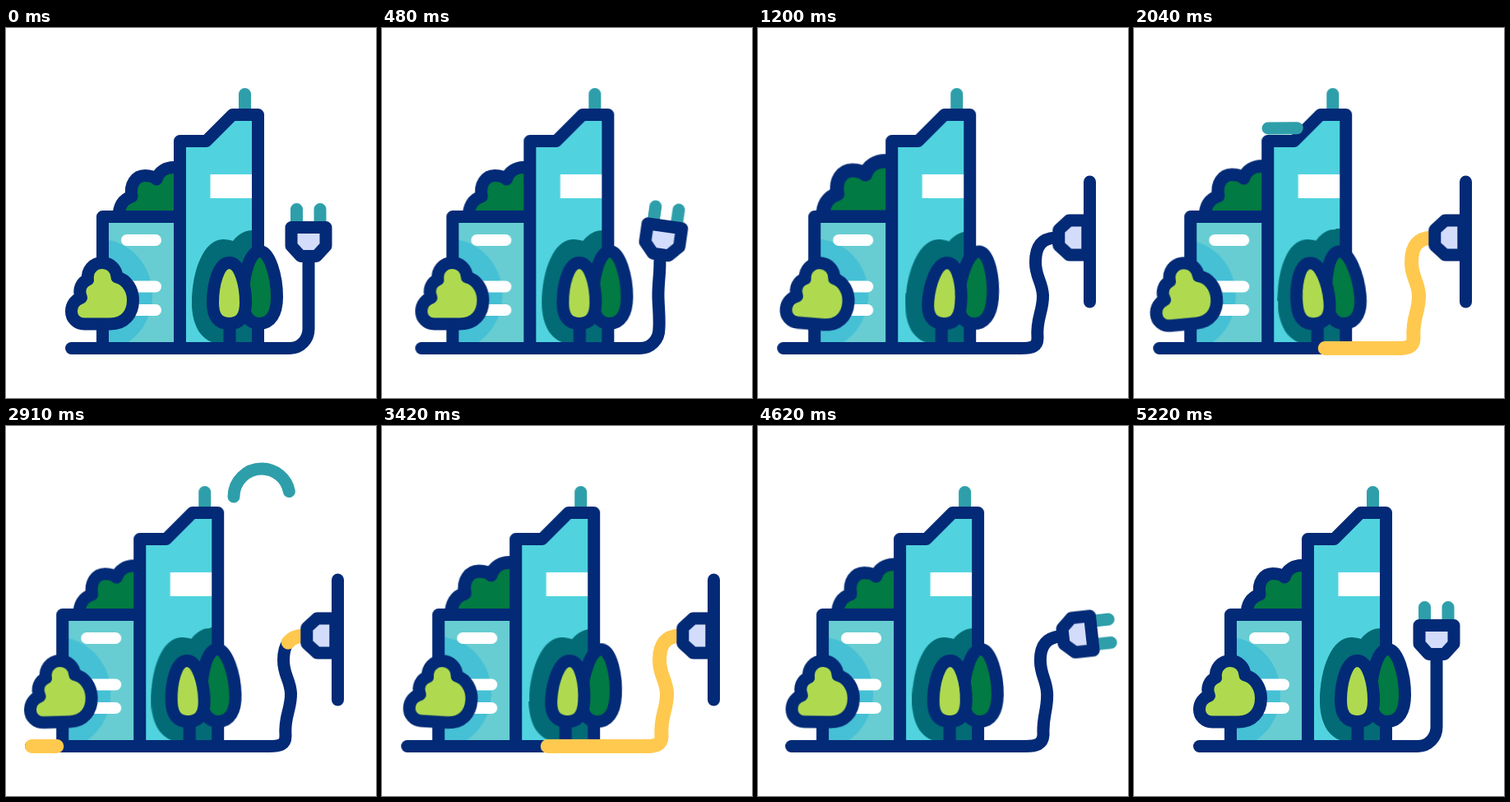
Write an HTML page without scripts that moves like this. It is 450 px wide and 450 px high and loops after 5400 ms.

```html
<!DOCTYPE html>
<html lang="en">
<head>
<meta charset="utf-8">
<title>Green building</title>
<style>
  html, body { margin: 0; width: 100%; height: 100%; overflow: hidden; background: #fff; }
  svg { display: block; width: 100vw; height: 100vh; }

  .line { stroke: #032a76; stroke-width: 15; stroke-linecap: round; stroke-linejoin: round; }
  .teal { stroke: #2e9faa; stroke-width: 15; stroke-linecap: round; }
  .bars { stroke: #fff; stroke-width: 14; stroke-linecap: round; }
  .leaf { fill: #027a43; }
  .lime { fill: #afda50; }

  .city, .sway, .bush, .wall, .plug, .prongs, .cable {
    animation: 5.4s linear infinite;
  }
  .city { animation-name: shift; }
  .sway { animation-name: sway; --lean: 1; }
  .bush { animation-name: swell; transform-origin: 211px 229px; }
  .wall { animation-name: wall; transform-origin: 403.5px 260px; }
  .plug { animation-name: plug; }
  .prongs { animation-name: prongs; }
  .cable { animation-name: cable; }

  .flow { opacity: 0; stroke-dasharray: 0 300; stroke-linecap: round; }
  .energy { stroke: #ffc94f; stroke-width: 17; animation: energy 5.4s linear 1.55s infinite; }
  .second { animation-delay: 2.87s; }
  .wind { animation: wind 5.4s linear 1.955s infinite; }

  @keyframes shift {
    0%, 4.44% { transform: none; animation-timing-function: ease-in-out; }
    12.04%, 83.15% { transform: translateX(-48.8px); animation-timing-function: ease-in-out; }
    90.93%, 100% { transform: none; }
  }
  @keyframes sway {
    0%, 7.78% { transform: rotate(0deg); animation-timing-function: ease-in-out; }
    21.3% { transform: rotate(calc(4.7deg * var(--lean))); animation-timing-function: ease-in-out; }
    40.74% { transform: rotate(calc(-5.8deg * var(--lean))); animation-timing-function: ease-in-out; }
    71.3% { transform: rotate(calc(5deg * var(--lean))); animation-timing-function: ease-in-out; }
    90.74%, 100% { transform: rotate(0deg); }
  }
  @keyframes swell {
    0%, 7.78% { transform: scale(1); animation-timing-function: ease-in-out; }
    21.3% { transform: scale(1.13); animation-timing-function: ease-in-out; }
    48% { transform: scale(.98); animation-timing-function: ease-in-out; }
    74.07% { transform: scale(1.1); animation-timing-function: ease-in-out; }
    90.74%, 100% { transform: scale(1); }
  }
  @keyframes wall {
    0%, 10.37% { transform: scaleY(0); animation-timing-function: ease-out; }
    14.8%, 80% { transform: scaleY(1); animation-timing-function: ease-in; }
    84.07%, 100% { transform: scaleY(0); }
  }
  @keyframes plug {
    0%, 4.44% { transform: translate(368px, 285px) rotate(0deg); animation-timing-function: ease-in-out; }
    8.89% { transform: translate(338px, 283px) rotate(8deg); }
    12.22% { transform: translate(322px, 272px) rotate(40deg); }
    15.56% { transform: translate(330px, 256px) rotate(85deg); animation-timing-function: ease-out; }
    18.52%, 83.33% { transform: translate(358.3px, 255px) rotate(90deg); animation-timing-function: ease-in; }
    85.93% { transform: translate(365px, 257px) rotate(82deg); }
    88.52% { transform: translate(360px, 266px) rotate(55deg); animation-timing-function: ease-out; }
    94.44%, 100% { transform: translate(368px, 285px) rotate(0deg); }
  }
  @keyframes prongs {
    0%, 15.56% { transform: none; animation-timing-function: ease-out; }
    18.52%, 82.2% { transform: translateY(25px); }
    84.07%, 100% { transform: none; }
  }
  @keyframes cable {
    0%, 4.44% {
      d: path("M250 389.5L345 389.5C358 389.5 368 379 368 366C368 352 368 338 368 325C368 312 368 300 368 290C368 286 368 282 368 278");
      animation-timing-function: ease-in-out;
    }
    8.89% { d: path("M250 389.5L314 389.5C327 389.5 337 379 337 366C338 350 336 338 336 325C336 310 338 300 338 288C338 284 338 280 339 276"); }
    12.22% { d: path("M250 389.5L299 389.5C312 389.5 322 379 324 366C328 352 329 340 328 325C326 312 316 305 315 293C314 285 317 277 325 269"); }
    15.56% {
      d: path("M250 389.5L315 389.5C328 389.5 336 386 337 374C337 353 344 345 343 325C341 308 324 303 322 287C321 268 320 257 335 256");
      animation-timing-function: ease-out;
    }
    18.52%, 83.33% {
      d: path("M250 389.5L320 389.5C333 389.5 340 388 340 377C338 353 347 345 346.5 325C345.5 308 337.5 303 337.5 285C337.5 265 345 256 362 255");
      animation-timing-function: ease-in;
    }
    85.93% { d: path("M250 389.5L327 389.5C340 389.5 348 387 349 375C348 353 354 345 353 325C352 308 345 303 345 285C345 267 353 258 369 256"); }
    88.52% {
      d: path("M250 389.5L337 389.5C350 389.5 359 383 360 370C360 352 362 341 361 325C360 309 351 303 350 288C349 278 354 270 365 262");
      animation-timing-function: ease-out;
    }
    94.44%, 100% { d: path("M250 389.5L345 389.5C358 389.5 368 379 368 366C368 352 368 338 368 325C368 312 368 300 368 290C368 286 368 282 368 278"); }
  }
  /* The dash grows from its start, travels, then shrinks into its end. */
  @keyframes energy {
    0% { opacity: 1; stroke-dasharray: 0 300; stroke-dashoffset: 0; }
    10.37% { stroke-dasharray: 63.6 300; stroke-dashoffset: 0; }
    16.3% { stroke-dasharray: 63.6 300; stroke-dashoffset: -36.4; }
    26.2%, 27.2% { opacity: 1; stroke-dasharray: .3 300; stroke-dashoffset: -99.7; }
    27.21%, 100% { opacity: 0; stroke-dasharray: .3 300; stroke-dashoffset: -99.7; }
  }
  @keyframes wind {
    0% { opacity: 1; stroke-dasharray: 0 300; stroke-dashoffset: 0; }
    8.24% { stroke-dasharray: 59.3 300; stroke-dashoffset: 0; }
    13.89% { stroke-dasharray: 59.3 300; stroke-dashoffset: -40.7; }
    22.3% { opacity: 1; stroke-dasharray: .3 300; stroke-dashoffset: -99.7; }
    22.31%, 100% { opacity: 0; stroke-dasharray: .3 300; stroke-dashoffset: -99.7; }
  }
</style>
</head>
<body>
<svg viewBox="0 0 450 450" fill="none">
  <defs>
    <clipPath id="house"><path d="M117 229H211V389H117Z"/></clipPath>
    <clipPath id="tower"><path d="M211 137H306V389H211Z"/></clipPath>
    <path id="current" pathLength="100" d="M362 255C345 256 337.5 265 337.5 285C337.5 303 345.5 308 346.5 325C347 345 338 353 340 377C340 388 333 389.5 320 389.5H31.5"/>
  </defs>

  <g class="city">
    <path class="bush line leaf" d="M137 230C137 217 142 208 153 205C150 190 158 179.5 169 179.5C175 179.5 180 181 183 184C186 174 195 169.5 204 169.5L215 171V230Z"/>

    <path fill="#67cdd2" d="M117 229H211V389H117Z"/>
    <g clip-path="url(#house)">
      <ellipse class="sway" style="transform-origin: 117px 385px" cx="114" cy="325" rx="64" ry="68" fill="#45c0d5"/>
    </g>
    <path class="bars" d="M147 258H182M147 314.5H182M147 343H182"/>
    <path class="line" d="M117.5 389V229.5H211"/>

    <path class="teal" d="M290.5 80.5V102"/>
    <path fill="#50d3df" d="M211.5 389V137.5H243.5L275.5 105.5H306.5V389Z"/>
    <path fill="#fff" d="M248.5 178H303V207H248.5Z"/>
    <g clip-path="url(#tower)">
      <path class="sway" style="--lean: .5; transform-origin: 265px 385px" fill="#026b75" d="M226 335C226 294 241 257 264 257C269 257 273 258 276 259C283 250 291 246 300 246H320V384H262C238 384 226 362 226 335Z"/>
    </g>
    <path class="line" d="M211.5 389V137.5H243.5L275.5 105.5H306.5V389"/>

    <path class="line" d="M272 362V384"/>
    <path class="sway line leaf" style="transform-origin: 307px 385px" d="M308.5 271.5C321 271.5 329.5 303 329.5 327C329.5 347 322 359.5 308 359.5C296 359.5 288 349 288 330C288 303 296 271.5 308.5 271.5Z"/>
    <path class="sway line lime" style="transform-origin: 272px 385px" d="M271.5 285.5C285 285.5 291.5 313 291.5 334C291.5 351 285 359.5 271.5 359.5C258 359.5 251.5 351 251.5 334C251.5 313 258 285.5 271.5 285.5Z"/>
    <path class="sway line lime" style="transform-origin: 117px 385px" d="M117 285.5C127 285.5 134.5 293 135 303C147 306 154.5 318 154.5 331C154.5 348 144 360 127 360H95C86 360 79.5 353 79.5 345C79.5 336 85 330 91.5 328C87 318 92 309 99.5 306C98 295 106 285.5 117 285.5Z"/>
    <path class="line" d="M79.5 389.5H315"/>
  </g>

  <path class="cable line" d="M250 389.5L345 389.5C358 389.5 368 379 368 366V278"/>
  <use href="#current" class="flow energy"/>
  <use href="#current" class="flow energy second"/>

  <g class="plug">
    <path class="prongs teal" d="M-14.5 -64.5V-43M14 -64.5V-43"/>
    <path class="line" fill="#d3dcfb" d="M-21 -42.5H21V-20L9.5 -7.5H-9.5L-21 -20Z"/>
  </g>
  <path class="wall line" d="M403.5 187V333"/>
  <path class="flow wind teal" pathLength="100" d="M163 122L307 120.5C330 120 345 105 345 86A34 34 0 0 0 277 86"/>
</svg>
</body>
</html>
```
